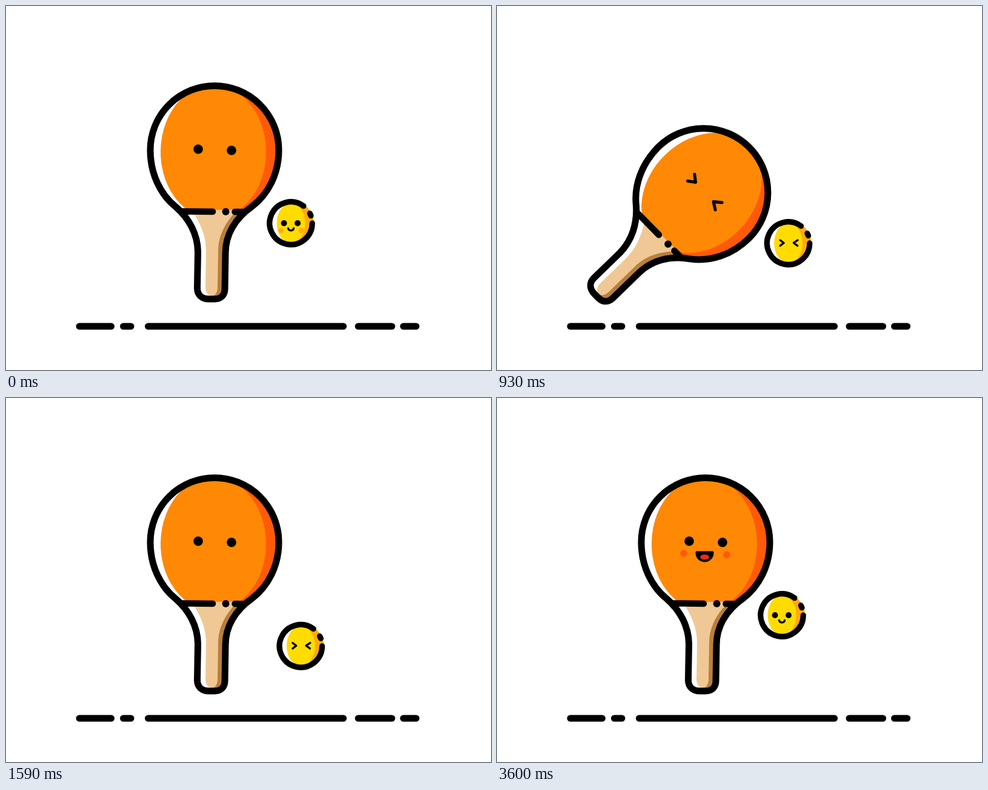
These frames come from a looping animation (800x600 px, 3630 ms). An HTML page:

```html
<!DOCTYPE html>
<html lang="en">
<head>
<meta charset="utf-8">
<title>Bat and ball</title>
<style>
  html, body { margin: 0; width: 100%; height: 100%; overflow: hidden; background: #fff; }
  svg { display: block; width: 100vw; height: 100vh; }
  .ink { fill: none; stroke: #000; stroke-linecap: round; stroke-linejoin: round; }
</style>
</head>
<body>
<svg viewBox="0 0 800 600">
  <defs>
    <path id="outline" d="M238 237.5A106 106 0 0 1 450 237.5C450 276 433 310 405 331C378 350 362 377 362 407L361 466C361 476 355 483 344 483H335C323 483 315.5 476 315.5 465L316.5 405C316 376 302 350 280 331C254 310 238 276 238 237.5Z"/>
    <clipPath id="inBat"><use href="#outline"/></clipPath>
    <clipPath id="mouthClip"><rect id="mouthWindow" x="320" y="252" width="45" height="20"/></clipPath>
  </defs>

  <path class="ink" stroke-width="11" d="M121 528H173.5M193.5 528H206M234.5 528H556.5M581 528H636.5M655.5 528H676.5"/>
  <path id="wall" class="ink" stroke-width="11"/>

  <g id="bat">
    <use href="#outline" fill="#fff"/>
    <g clip-path="url(#inBat)">
      <path fill="#ff5a0a" d="M342 125H460V338H342Z"/>
      <path fill="#b8803c" d="M340 338H410V490H339Z"/>
      <path fill="#ff8805" d="M302 338A87 110 0 1 1 382 338Z"/>
      <path fill="#f0c896" d="M306 336C322 360 330 380 330 405L329 464C329 472 334 478 339 478C345 478 349 472 349 463L350 405C350 380 360 358 382 336Z"/>
    </g>
    <use href="#outline" class="ink" stroke-width="11"/>
    <path class="ink" stroke-width="10.5" d="M290 338.5L341 339M377.5 339.3L392 339.5"/>
    <circle cx="362.5" cy="339" r="6"/>
    <g id="batEyes"><circle cx="317" cy="236" r="7.8"/><circle cx="372" cy="238" r="7.8"/></g>
    <path id="batSquint" class="ink" stroke-width="5" d="M312 226.7L322.4 234.8L311.8 242.6M377 227.7L366 236.6L377.6 244"/>
    <g id="batCheeks" fill="#ff5a0a"><circle cx="308" cy="256" r="5.8"/><circle cx="379" cy="258.3" r="5.8"/></g>
    <g clip-path="url(#mouthClip)">
      <path d="M329 252.5H356Q357.5 252.5 357.5 255.5A15 15 0 0 1 327.5 255.5Q327.5 252.5 329 252.5Z"/>
      <ellipse cx="342.5" cy="262.3" rx="7.3" ry="4.2" fill="#f0281e"/>
    </g>
  </g>

  <g id="ball">
    <path fill="#ffaa0d" d="M0-37A38 37 0 0 1 0 37Z"/>
    <ellipse rx="23.5" ry="33" fill="#ffdc00"/>
    <path class="ink" stroke-width="9.2" d="M35.2 0A35.2 35.2 0 1 1 20.9-28.3M31.2-16.2L33-12.3"/>
    <g id="ballEyes"><circle id="eyeL" cx="-11.5" r="5"/><circle id="eyeR" cx="11" r="5"/></g>
    <path id="ballSquint" class="ink" stroke-width="3.3" d="M-13.5-5L-7.5-.5L-13.5 4.2M15.5-5L8.7-.5L15 4.2"/>
    <path id="smile" class="ink" stroke-width="3.2" pathLength="100" d="M-4.6 8.3A4.7 4.9 0 0 0 4.6 8.3"/>
    <g id="ballCheeks" fill="#ffaa1a"><circle cx="-16.5" cy="12.3" r="4.3"/><circle cx="17" cy="12.3" r="4.3"/></g>
  </g>
</svg>
<script>
const LOOP = 3630, STEP = 30, HIT = 892;
const $ = id => document.getElementById(id);
const set = (id, attrs) => { for (const k in attrs) $(id).setAttribute(k, attrs[k]); };
const show = (id, on) => set(id, { opacity: Number(on) });
const ramp = (t, a, b) => Math.min(1, Math.max(0, (t - a) / (b - a)));
const ease = (t, a, b) => { const u = ramp(t, a, b); return u * u * (3 - 2 * u); };

// time, x, y: struck, floor, wall, floor, home
const flight = [
  [HIT, 470, 358], [1050, 514, 495], [1283, 662, 295], [1505, 514, 495], [1640, 470, 358]
];

function ballAt(t) {
  let i = 1;
  while (i < flight.length - 1 && t > flight[i][0]) i++;
  const [t0, x0, y0] = flight[i - 1], [t1, x1, y1] = flight[i];
  const u = ramp(t, t0, t1);
  return [x0 + (x1 - x0) * u, y0 + (y1 - y0) * u];
}

function drawBat(t) {
  const back = ease(t, 930, 1230);
  const angle = 45 * (ease(t, 540, 790) - back);
  const sink = ease(t, 540, 830) - back;
  set('bat', { transform: `translate(${-3.5 * sink} ${70 * sink}) rotate(${angle} 344 238)` });

  const glance = Math.sin(Math.PI * ramp(t, 0, 540)) ** 2;
  const squint = t >= HIT - 20 && t < 1170;
  set('batEyes', { transform: `translate(${21 * glance} ${19 * glance})` });
  show('batEyes', !squint);
  show('batSquint', squint);
  show('batCheeks', ramp(t, 1650, 2160));
  set('mouthWindow', { y: 271 - 19.5 * ease(t, 1650, 2160) });
}

function drawBall(t) {
  set('ball', { transform: `translate(${ballAt(t)})` });
  const happy = t < HIT - 20;
  const wake = ramp(t, 2250, 2610);
  const grin = happy ? 1 : ramp(t, 3090, 3600);
  const r = happy ? 5 : 4.9 * wake;
  set('eyeL', { r });
  set('eyeR', { r });
  show('ballSquint', happy ? 0 : 1 - wake);
  show('smile', grin > 0);
  set('smile', { 'stroke-dasharray': `${100 * grin} 200` });
  show('ballCheeks', happy);
}

function drawWall(t) {
  const size = ramp(t, 1215, 1290) * (1 - ramp(t, 1290, 1590));
  const dash = (y, half) => `M706.3 ${y - half * size}V${y + half * size}`;
  show('wall', size > 0);
  set('wall', { d: dash(202, 22) + dash(264, 3.6) });
}

function frame(now) {
  const t = Math.floor((now % LOOP) / STEP) * STEP;
  drawBat(t);
  drawBall(t);
  drawWall(t);
  requestAnimationFrame(frame);
}
frame(0);
</script>
</body>
</html>
```
